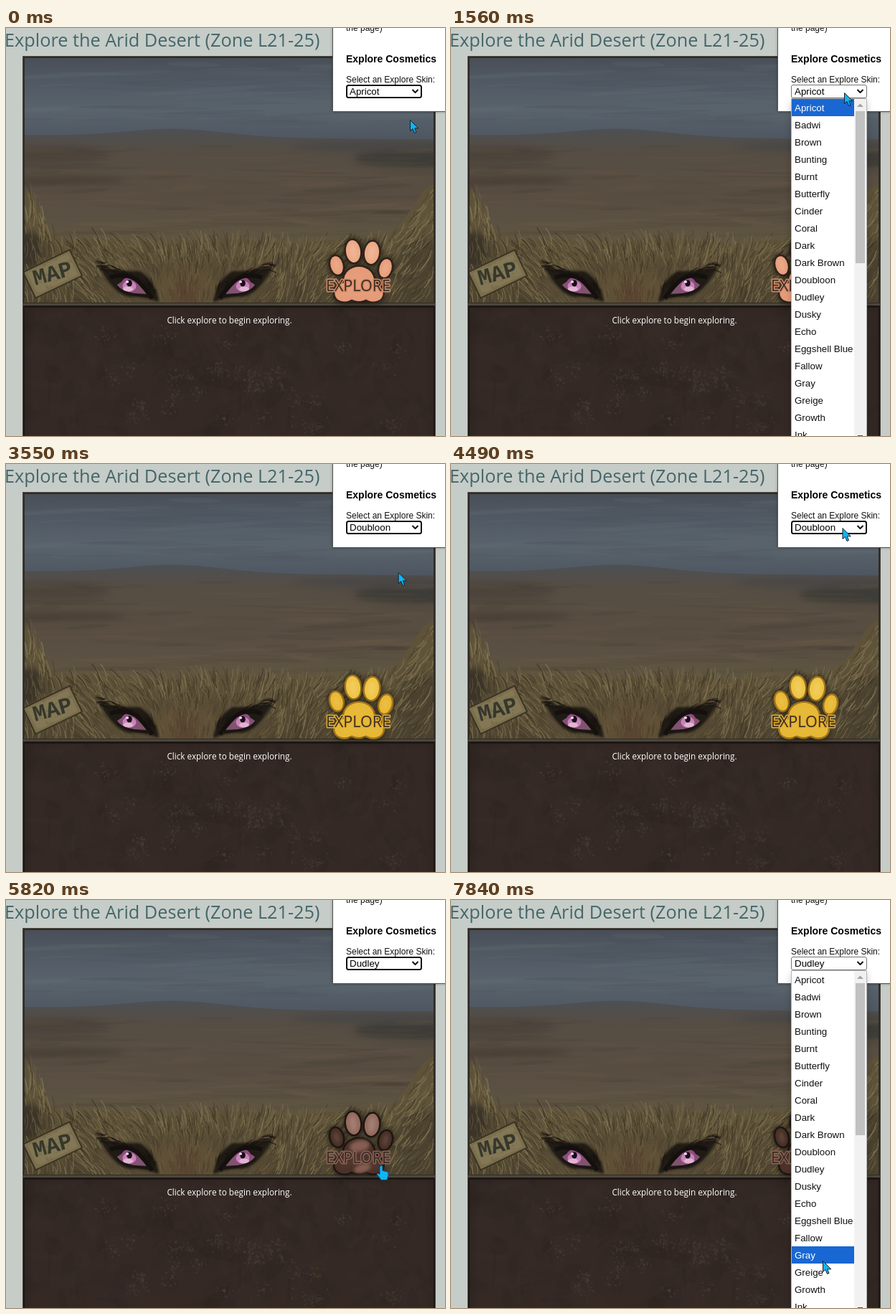
Animation, 612 px wide and 569 px high, one loop 8 s. Source, as an HTML page with a canvas:

```html
<!DOCTYPE html>
<html lang="en">
<head>
<meta charset="utf-8">
<title>Explore skins</title>
<style>
  html, body { margin: 0; width: 612px; height: 569px; overflow: hidden; background: #c6ccc8; }
  canvas { display: block; }
</style>
</head>
<body>
<canvas id="stage" width="612" height="569"></canvas>
<script>
const LOOP = 8000, TAU = Math.PI * 2;
const SANS = '"Liberation Sans", Arial, sans-serif', OPEN = '"Open Sans", sans-serif';
const ITEMS = ['Apricot', 'Badwi', 'Brown', 'Bunting', 'Burnt', 'Butterfly', 'Cinder', 'Coral', 'Dark',
  'Dark Brown', 'Doubloon', 'Dudley', 'Dusky', 'Echo', 'Eggshell Blue', 'Fallow', 'Gray', 'Greige', 'Growth', 'Ink'];
const SKINS = {
  Apricot: { rim: '#2e231c', halo: '#d58b69', outer: '#e9a07c', inner: '#eda986', pad: '#e69b78' },
  Doubloon: { rim: '#a0731b', halo: '#e3b02f', outer: '#e9b934', inner: '#efc545', pad: '#e7b835' },
  Dudley: { rim: '#1d1613', halo: '#8d6357', outer: '#4a3026', inner: '#946a5d', pad: '#4b3128', patch: '#855d51' }
};

const easeIn = u => u * u * u;
const easeOut = u => 1 - (1 - u) * (1 - u);
const easeBoth = u => u * u * (3 - 2 * u);
const START = { x: 563, y: 128 };
const MOVES = [
  { from: 0, to: 150, x: 563, y: 132, ease: easeOut },
  { from: 560, to: 760, x: 553, y: 120, ease: easeOut },
  { from: 1080, to: 1560, x: 548, y: 90, ease: easeOut },
  { from: 1560, to: 2740, x: 530, y: 349, ease: easeIn },
  { from: 3040, to: 4120, x: 553, y: 75, ease: easeOut },
  { from: 4120, to: 4614, x: 545, y: 90, ease: easeOut },
  { from: 4614, to: 5340, x: 532, y: 366, ease: easeBoth },
  { from: 5780, to: 5820, x: 522, y: 371, ease: easeOut },
  { from: 5820, to: 6780, x: 521, y: 90, ease: easeOut },
  { from: 7210, to: 7840, x: 518, y: 503, ease: easeBoth }
];
// Each pick: when the list opens, when it closes, what was selected before
const PICKS = [
  { open: 1560, close: 3040, before: 'Apricot' },
  { open: 4540, close: 5820, before: 'Doubloon' },
  { open: 7210, close: LOOP, before: 'Dudley' }
];

const view = document.getElementById('stage').getContext('2d');
let c = view, seed = 7;
const rnd = (a = 0, b = 1) => {
  seed = (seed * 16807) % 2147483647;
  return a + (b - a) * seed / 2147483647;
};
const pick = list => list[Math.floor(rnd(0, list.length))];

function rect(x, y, w, h, color) { c.fillStyle = color; c.fillRect(x, y, w, h); }
function text(s, x, y, font, color) { c.font = font; c.fillStyle = color; c.fillText(s, x, y); }
function gradient(y0, y1, colors) {
  const g = c.createLinearGradient(0, y0, 0, y1);
  colors.forEach((color, i) => g.addColorStop(i / (colors.length - 1), color));
  return g;
}
function ellipse(x, y, rx, ry, fill, turn = 0) {
  c.beginPath();
  c.ellipse(x, y, rx, ry, turn, 0, TAU);
  c.fillStyle = fill;
  c.fill();
}
function paint(path, fill, line, width = 1) {
  const p = new Path2D(path);
  if (fill) { c.fillStyle = fill; c.fill(p); }
  if (line) { c.strokeStyle = line; c.lineWidth = width; c.stroke(p); }
}
function hair(x, y, angle, length, bend, color, width) {
  const dx = Math.cos(angle) * length, dy = Math.sin(angle) * length;
  c.beginPath();
  c.moveTo(x, y);
  c.quadraticCurveTo(x + dx / 2 - dy * bend, y + dy / 2 + dx * bend, x + dx, y + dy);
  c.strokeStyle = color;
  c.lineWidth = width;
  c.stroke();
}
function ridge(height, fill) {
  c.beginPath();
  c.moveTo(25, 384);
  for (let x = 25; x <= 597; x += 4) c.lineTo(x, height(x));
  c.lineTo(597, 384);
  c.fillStyle = fill;
  c.fill();
}
function streaks(count, top, bottom, colors) {
  for (let i = 0; i < count; i++)
    ellipse(rnd(25, 597), rnd(top, bottom), rnd(20, 90), rnd(1, 4), pick(colors), rnd(-.08, .06));
}

function drawDesert() {
  rect(25, 41, 572, 343, gradient(41, 150, ['#494f58', '#515a64', '#59636c', '#505963']));
  streaks(70, 42, 135, ['#454a5322', '#66707722', '#4a525b33', '#5f697133']);
  ridge(x => 149 - 11 * Math.exp(-(((x - 235) / 95) ** 2)) + x / 90,
    gradient(138, 300, ['#4c5055', '#554d44', '#584e42', '#584d41', '#5b5143', '#60563f']));
  c.filter = 'blur(4px)';
  ellipse(60, 177, 85, 13, '#46403a99');
  ellipse(80, 212, 85, 6, '#41382f99');
  ellipse(575, 182, 90, 13, '#363735bb');
  ellipse(530, 165, 130, 8, '#42454688');
  c.filter = 'none';
  streaks(110, 165, 290, ['#3b332b1c', '#7a6a5014', '#4b42362a', '#66594320']);
}

// Top of the fur: a flat brow with an ear rising at either side
const furTop = x => 297 - 76 * Math.exp(-(((x - 24) / 30) ** 2)) - 82 * Math.exp(-(((598 - x) / 45) ** 2)) + 3 * Math.sin(x / 28);
function furAngle(x) {
  if (x < 100) return -1.95 + x * .004;
  if (x > 450) return -.85 - (x - 450) * .0015;
  return -2.5 + (x - 100) * .0045;
}
function drawFur() {
  ridge(furTop, gradient(215, 384, ['#5d5239', '#5f543a', '#594e36', '#4d432f']));
  c.filter = 'blur(5px)';
  ellipse(32, 310, 22, 26, '#3b3428');
  ellipse(575, 345, 34, 55, '#4a412f');
  c.filter = 'none';
  const tones = ['#837653', '#746847', '#867a56', '#5b5037', '#463d2b', '#3c3424', '#6b6042'];
  for (let i = 0; i < 1700; i++) {
    const x = rnd(25, 597), top = furTop(x);
    const y = top + (384 - top) * rnd() ** 1.2 + 8;
    hair(x, y, furAngle(x) + rnd(-.22, .22) + .2 * Math.sin(x / 17), rnd(12, 29), rnd(.05, .25), pick(tones) + 'b8', rnd(.6, 1.6));
  }
  c.filter = 'blur(6px)';
  ellipse(251, 362, 125, 34, '#564a35dd');
  ellipse(251, 365, 46, 30, '#625339cc');
  ellipse(251, 372, 17, 26, '#56412fbb');
  c.filter = 'none';
  for (let i = 0; i < 380; i++) {
    const x = rnd(130, 374), out = (x - 251) / 123;
    hair(x, rnd(325, 388), -TAU / 4 + out * .9 + rnd(-.2, .2), rnd(7, 18), .15, pick(['#453b2a77', '#75684977', '#3a302466', '#665a4088', '#6b503a55']), rnd(.7, 1.6));
  }
}

// Drawn with the nose on the right, then mirrored
function drawEye(side) {
  c.save();
  c.translate(251 - side * 79, 357);
  c.scale(side, 1);
  c.filter = 'blur(1.5px)';
  paint('M-42-24 Q-8-17 14-18 Q36-6 41 25 Q18 16 0 18 Q-22 14-42-24', '#1b1612e8');
  c.filter = 'none';
  for (let i = 0; i < 60; i++) {
    const u = rnd(-1, 1);
    hair(u * 37, u * 19 - 8 + rnd(-5, 6), -2.5 + u * .7 + rnd(-.3, .3), rnd(6, 15), .15, '#1a1511b0', rnd(.8, 2));
  }
  paint('M-17 1 Q0-12 14 0 Q20 9 26 14 Q6 13-6 12 Q-13 9-17 1', '#80536f');
  ellipse(0, 1, 11.5, 10.5, '#8f4c82');
  ellipse(0, 3, 9.5, 7.5, '#c586b6');
  ellipse(-2, 7, 7, 3.5, '#e3b3d4');
  ellipse(0, -1, 3.8, 4.6, '#160e14');
  ellipse(-3 * side, -3, 2.2, 1.8, '#f1e0ec');
  paint('M-27-9 Q-2-17 13-3 Q22 6 32 20', null, '#14100d', 6);
  paint('M-17 4 Q-8 15 28 17', null, '#1b1512', 3);
  c.restore();
}

function drawTag() {
  c.save();
  c.translate(65, 343);
  c.rotate(-.45);
  rect(-37, -21, 74, 42, '#3b3423');
  rect(-35, -19, 70, 38, '#7a6e4d');
  rect(-31, -16, 62, 32, '#837755');
  for (let i = 0; i < 35; i++) ellipse(rnd(-30, 30), rnd(-16, 16), rnd(1, 5), rnd(.5, 2), '#665b3d40');
  c.rotate(.18);
  c.textAlign = 'center';
  text('MAP', 0, 9, 'bold 31px "Liberation Mono", monospace', '#35372c');
  c.restore();
}

function drawLowerBox() {
  rect(23, 384, 576, 185, '#4c473d');
  rect(24, 387, 574, 182, '#1d1715');
  c.save();
  c.beginPath();
  c.rect(26, 390, 570, 179);
  c.clip();
  rect(26, 390, 570, 179, '#342925');
  for (let i = 0; i < 260; i++)
    ellipse(rnd(26, 596), rnd(390, 569), rnd(4, 32), rnd(2, 14), pick(['#2a201d20', '#41363118', '#261d1b1c']), rnd(0, 3));
  for (let patch = 0; patch < 34; patch++) {
    const x = rnd(120, 560), y = rnd(425, 560);
    for (let i = 0; i < 26; i++)
      ellipse(x + rnd(-22, 22) * rnd(), y + rnd(-16, 16) * rnd(), rnd(.5, 3), rnd(.4, 1.5), pick(['#51454066', '#463b3688', '#40342f88']), rnd(0, 3));
  }
  c.shadowColor = '#0008';
  c.shadowBlur = 10;
  c.strokeStyle = '#1d1715';
  c.lineWidth = 2;
  c.strokeRect(25, 389, 572, 220);
  c.restore();
  c.textAlign = 'center';
  text('Click explore to begin exploring.', 311.5, 412, '11.75px ' + OPEN, '#fff');
  c.textAlign = 'left';
}

function drawPanel() {
  c.save();
  c.shadowColor = '#0009';
  c.shadowBlur = 4;
  rect(456, -5, 160, 121, '#fff');
  c.restore();
  c.strokeStyle = '#555';
  c.lineWidth = 1;
  c.strokeRect(455.5, -5.5, 170, 122);
  text('the page)', 474, 4, '12px ' + SANS, '#111');
  text('Explore Cosmetics', 474, 48, 'bold 14px ' + SANS, '#000');
  text('Select an Explore Skin:', 474, 76, '12px ' + SANS, '#111');
}

function buildScene() {
  const layer = document.createElement('canvas');
  layer.width = 612;
  layer.height = 569;
  c = layer.getContext('2d');
  rect(0, 0, 612, 569, '#c6ccc8');
  text('Explore the Arid Desert (Zone L21-25)', -2, 26, '25.28px ' + OPEN, '#446769');
  rect(23, 39, 576, 530, '#4b453b');
  c.save();
  c.beginPath();
  c.rect(25, 41, 572, 343);
  c.clip();
  drawDesert();
  drawFur();
  drawEye(1);
  drawEye(-1);
  drawTag();
  c.restore();
  c.strokeStyle = '#302c27';
  c.lineWidth = 2;
  c.strokeRect(25, 41, 572, 343);
  drawLowerBox();
  c = view;
  return layer;
}

function drawPaw(skin) {
  const parts = (grow, toeOuter, toeInner, pad) => {
    for (const side of [-1, 1]) {
      ellipse(495 + side * 34, 333 + side * 2, 8.5 + grow, 13 + grow, toeOuter, side * .25);
      ellipse(497 + side * 13, 312.5 + side, 10 + grow, 15.5 + grow, toeInner, side * .12);
    }
    ellipse(492, 352, 21 + grow, 19 + grow, pad);
    for (const side of [-1, 0, 1]) ellipse(492 + side * 18, 368, 16 + grow, 13 + grow, pad, side * .4);
  };
  c.save();
  c.shadowColor = '#1a1510';
  c.shadowBlur = 9;
  parts(2.5, skin.rim, skin.rim, skin.rim);
  c.restore();
  parts(0, skin.outer, skin.inner, skin.pad);
  c.filter = 'blur(2px)';
  parts(-5, '#ffffff1c', '#ffffff22', '#ffffff06');
  if (skin.patch) {
    ellipse(493, 343, 14, 8, skin.patch, -.2);
    ellipse(497, 374, 12, 6, skin.patch, -.3);
  }
  c.filter = 'none';
  c.font = '21.5px ' + OPEN;
  c.lineJoin = 'round';
  c.strokeStyle = skin.halo;
  c.lineWidth = 3;
  c.strokeText('EXPLORE', 446, 367);
  text('EXPLORE', 446, 367, c.font, '#392b22');
}

function drawSelect(label, focused) {
  const inset = focused ? 1 : .5;
  c.beginPath();
  c.roundRect(474 + inset, 79 + inset, 106 - 2 * inset, 19 - 2 * inset, 2.5);
  c.fillStyle = '#fff';
  c.fill();
  c.strokeStyle = focused ? '#101010' : '#767676';
  c.lineWidth = 2 * inset;
  c.stroke();
  text(label, 479, 93, '13.33px ' + SANS, '#000');
  paint('M566.5 86 l4 4 l4-4', null, '#111', 2);
}

function drawList(active) {
  c.save();
  c.shadowColor = '#0004';
  c.shadowBlur = 10;
  c.shadowOffsetY = 4;
  rect(475, 99, 104, 480, '#fff');
  c.restore();
  c.strokeStyle = '#b5b5b5';
  c.lineWidth = 1;
  c.strokeRect(474.5, 98.5, 105, 490);
  ITEMS.forEach((name, i) => {
    const y = 99 + 24 * i;
    if (i === active) rect(475, y, 87, 24, '#1967d2');
    text(name, 479, y + 17, '13.33px ' + SANS, i === active ? '#fff' : '#111');
  });
  rect(562, 99, 17, 470, '#f1f1f1');
  rect(564, 116, 13, 212, '#c1c1c1');
  paint('M566 110 l4.5-4.5 l4.5 4.5z', '#a3a3a3');
  rect(567, 568, 7, 1, '#505050');
}

function drawCursor({ x, y }, hand) {
  c.save();
  c.translate(x, y);
  if (hand) paint('M-1 1 Q1-1 3 1 V7 L11 9 V14 L9 20 H1 L-5 12 Q-4 9-1 12z', '#12b4f5', '#0d4f75');
  else paint('M.5.5 V15.5 L4 12.5 L6.5 18.5 L9 17.5 L6.8 11.8 H11.8z', '#12b4f5', '#14212c');
  c.restore();
}

function cursorAt(t) {
  let { x, y } = START;
  for (const m of MOVES) {
    if (t <= m.from) break;
    const u = m.ease(Math.min(1, (t - m.from) / (m.to - m.from)));
    x += (m.x - x) * u;
    y += (m.y - y) * u;
  }
  return { x, y };
}

const scene = buildScene();

function render(now) {
  const t = now % LOOP, cursor = cursorAt(t);
  const { open, before } = PICKS.find(p => t < p.close);
  const opened = t >= open;
  // The highlight trails the pointer a little
  const row = Math.floor((cursorAt(t - 50).y - 99) / 24);
  const onPaw = Math.abs(cursor.x - 492) < 47 && Math.abs(cursor.y - 338) < 45;
  c.drawImage(scene, 0, 0);
  drawPaw(SKINS[before]);
  drawPanel();
  drawSelect(before, !opened);
  if (opened) drawList(row < 0 ? ITEMS.indexOf(before) : row);
  drawCursor(cursor, !opened && onPaw);
  requestAnimationFrame(render);
}
requestAnimationFrame(render);
</script>
</body>
</html>
```
